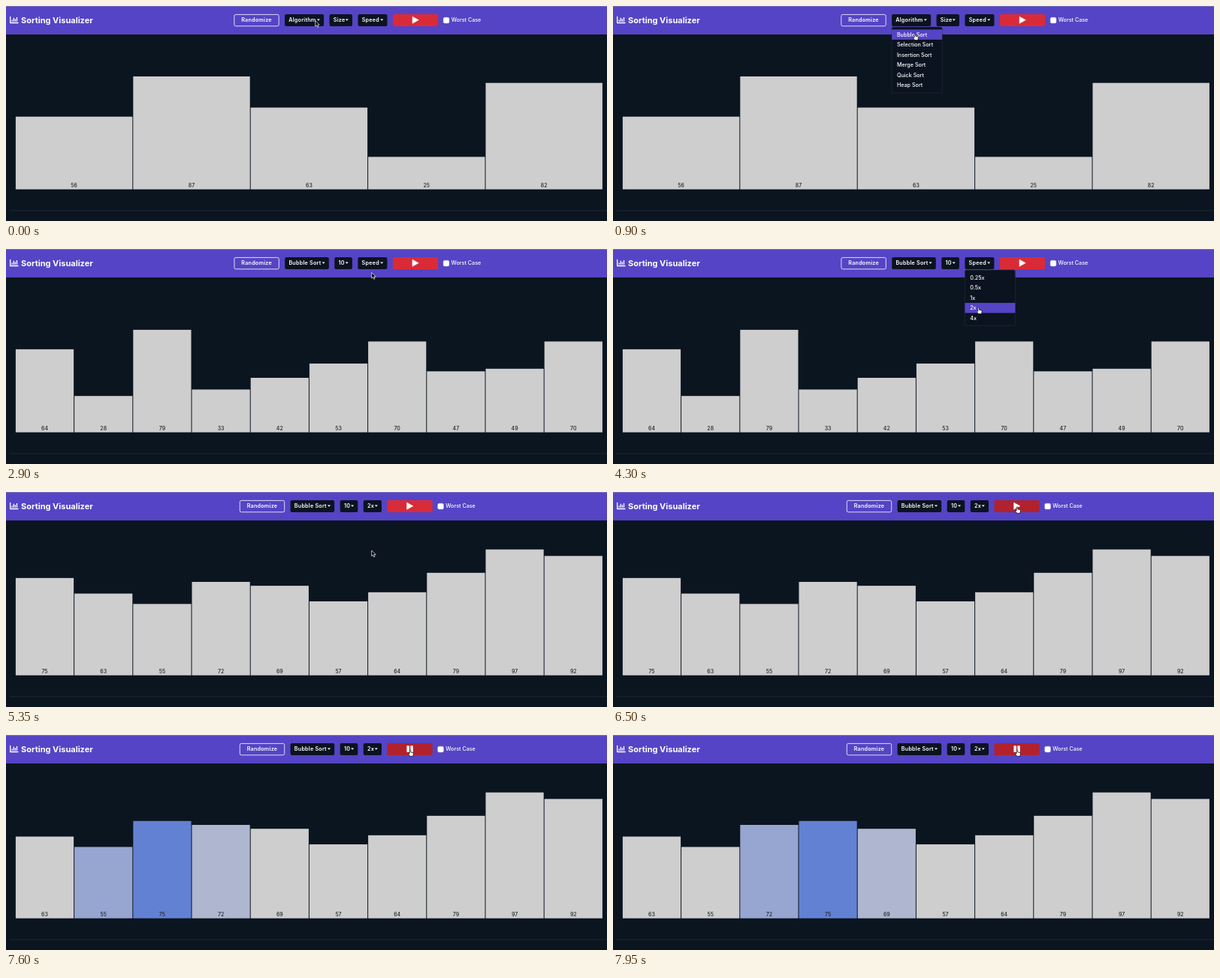
An HTML page for the animation above (8000 ms loop, 800 by 287 pixels).

```html
<!DOCTYPE html>
<html lang="en">
<head>
<meta charset="utf-8">
<title>Sorting Visualizer</title>
<style>
  html, body { margin: 0; width: 100%; height: 100%; overflow: hidden; background: #0b1520; }
  svg { display: block; width: 100vw; height: 100vh; }
  text { font-family: Inter, "Open Sans", sans-serif; font-size: 7.2px; font-weight: 500; fill: #fff; white-space: pre; }
  .title { font-size: 11px; font-weight: 700; }
  .btn { font-weight: 600; letter-spacing: .22px; }
  .num { font-size: 7px; fill: #20242a; text-anchor: middle; }
</style>
</head>
<body>
<svg id="stage" viewBox="0 0 800 287"></svg>
<script>
const LOOP = 8000, FLOOR = 244.7, UNIT = 1.732;
const PICK_ALGO = 1000, PICK_SIZE = 2400, PICK_SPEED = 4400, PLAY = 6800;
const HEIGHT_MS = 200, FADE_MS = 150;
const stage = document.getElementById('stage');

// CSS "ease": cubic-bezier(.25, .1, .25, 1)
function ease(x) {
  if (x <= 0) return 0;
  if (x >= 1) return 1;
  let lo = 0, hi = 1;
  for (let i = 0; i < 18; i++) {
    const s = (lo + hi) / 2, r = 1 - s;
    if (.75 * r * s + s * s * s < x && .75 * r * r * s + .75 * r * s * s + s * s * s < x) lo = s;
    else hi = s;
  }
  const s = (lo + hi) / 2, r = 1 - s;
  return .3 * r * r * s + 3 * r * s * s + s * s * s;
}

// Value of a chain of [time, target] events, each a transition that interrupts the last
function track(events, t, ms) {
  let [at, to] = events[0], from = to;
  const now = u => from + (to - from) * ease((u - at) / ms);
  for (const [time, target] of events.slice(1)) {
    if (time > t) break;
    from = now(time);
    at = time;
    to = target;
  }
  return now(t);
}

const latest = (events, t) => events.reduce((v, e) => e[0] <= t ? e[1] : v, events[0][1]);

// Bars: one height track and one highlight track each
const arrays = [
  [0, [56, 87, 63, 25, 82]],
  [PICK_ALGO, [47, 15, 34, 36, 60]],
  [PICK_SIZE, [64, 28, 79, 33, 42, 53, 70, 47, 49, 70]],
  [PICK_SPEED, [75, 63, 55, 72, 69, 57, 64, 79, 97, 92]]
];
const bars = Array.from({ length: 10 }, (_, i) => ({
  value: arrays.filter(a => i < a[1].length).map(([t, a]) => [t, a[i]]),
  glow: [[0, 0]]
}));

function bubbleSort(a, start, period) {
  for (let i = 0; start + i * period < LOOP; i++) {
    const t = start + i * period, pair = [i, i + 1];
    pair.forEach(k => bars[k].glow.push([t, 1]));
    if (a[i] > a[i + 1]) {
      [a[i], a[i + 1]] = [a[i + 1], a[i]];
      pair.forEach(k => bars[k].value.push([t + 123, a[k]]));
    }
    pair.forEach(k => bars[k].glow.push([t + 332, 0]));
  }
}
bubbleSort([...arrays[3][1]], 6873, 350);

const menus = [
  { slot: 1, open: 350, close: PICK_ALGO, items: ['Bubble Sort', 'Selection Sort', 'Insertion Sort', 'Merge Sort', 'Quick Sort', 'Heap Sort'] },
  { slot: 2, open: 1720, close: PICK_SIZE, items: ['5', '10', '20', '50', '100'] },
  { slot: 3, open: 3100, close: PICK_SPEED, items: ['0.25x', '0.5x', '1x', '2x', '4x'] }
];
const MENU = { top: 28, pad: 3.4, row: 13.5, width: 67 };

// Pointer stops: time, x, y
const path = [
  [0, 411.7, 19.5], [500, 411.7, 19.5], [850, 402, 37], [1150, 402, 37],
  [1550, 447, 18.5], [1850, 447, 18.5], [2200, 450, 51], [2550, 450, 51],
  [2900, 486.7, 31.5], [3050, 487, 20], [3450, 487, 20], [4150, 486.7, 78],
  [5450, 486.7, 78], [5950, 538, 19.7], [LOOP, 538, 19.7]
];

function pointer(t) {
  const i = path.findIndex(p => p[0] > t);
  const [t0, x0, y0] = path[i - 1], [t1, x1, y1] = path[i];
  const u = (t - t0) / (t1 - t0), k = u * u * (3 - 2 * u);
  return { x: x0 + (x1 - x0) * k, y: y0 + (y1 - y0) * k };
}

const rect = (x, y, w, h, fill, rx = 0, extra = '') =>
  `<rect x="${x}" y="${y}" width="${w}" height="${h}" rx="${rx}" fill="${fill}" ${extra}/>`;
const text = (x, y, s, cls = '', extra = '') =>
  `<text x="${x}" y="${y}" class="${cls}" ${extra}>${s}</text>`;
const shape = (d, extra) => `<path d="${d}" ${extra}/>`;

// Toolbar slots centred as a row: Randomize, three dropdowns, play
function layout(t) {
  const widths = [60.2, t < PICK_ALGO ? 52 : 58.6, t < PICK_SIZE ? 30.4 : 23.6, t < PICK_SPEED ? 39 : 24.2, 60.2];
  let x = 303.4 + (241.8 - widths.reduce((a, b) => a + b)) / 2;
  return widths.map(w => {
    const slot = { x, w };
    x += w + 7.5;
    return slot;
  });
}

const over = (p, s) => p.x >= s.x && p.x <= s.x + s.w && p.y >= 11 && p.y <= 27;

function dropdown({ x, w }, label) {
  const c = x + w - 7.2;
  return rect(x, 11, w, 16, '#0b1320', 2) + text(x + 5.2, 21.3, label, 'btn') +
    shape(`M${c - 2} 17.6h4l-2 2.1z`, 'fill="#fff"');
}

function header(t, slots, p) {
  const [rand, algo, size, speed, play] = slots;
  const mid = play.x + play.w / 2, end = play.x + play.w + 7;
  const icon = t < PLAY
    ? shape(`M${mid - 4} 14.2v9l8.2-4.5z`, 'fill="#fff" stroke="#fff" stroke-width=".6" stroke-linejoin="round"')
    : rect(mid - 4.2, 14.2, 3.5, 8.8, '#fff', .7) + rect(mid + .7, 14.2, 3.5, 8.8, '#fff', .7);
  return rect(0, 0, 800, 38, '#5544c5') + rect(0, 0, 800, .8, '#8079b8') +
    shape('M5.7 14.5v8h10.3', 'fill="none" stroke="#fff" stroke-width="1.3" stroke-linecap="round" stroke-linejoin="round"') +
    shape('M8.2 20.8v-2.2M10.3 20.8v-5M12.4 20.8v-3.6M14.5 20.8v-5.8', 'stroke="#fff" stroke-width="1.3"') +
    text(20, 23.3, 'Sorting Visualizer', 'title') +
    rect(rand.x + .4, 11.4, rand.w - .8, 15.4, 'none', 2, 'stroke="#fff" stroke-width=".8"') +
    text(rand.x + rand.w / 2, 21.3, 'Randomize', 'btn', 'text-anchor="middle"') +
    dropdown(algo, t < PICK_ALGO ? 'Algorithm' : 'Bubble Sort') +
    dropdown(size, t < PICK_SIZE ? 'Size' : '10') +
    dropdown(speed, t < PICK_SPEED ? 'Speed' : '2x') +
    rect(play.x, 11, play.w, 16, over(p, play) ? '#b1222d' : '#d92b37', 2) + icon +
    rect(end, 15.2, 7.8, 7.8, '#fff', 1.8, 'stroke="#c9c9d6" stroke-width=".4"') +
    text(end + 10.5, 21.1, 'Worst Case');
}

function chart(t) {
  const n = t < PICK_SIZE ? 5 : 10, step = 782 / n;
  return bars.slice(0, n).map(({ value, glow }, i) => {
    const h = track(value, t, HEIGHT_MS) * UNIT, g = track(glow, t, FADE_MS);
    const mix = (a, b) => Math.round(a + (b - a) * g);
    const x = 12.9 + i * step, w = step - 1;
    return rect(x, FLOOR - h, w, h, `rgb(${mix(206, 88)},${mix(206, 121)},${mix(206, 212)})`) +
      text(x + w / 2, 241.8, latest(value, t), 'num');
  }).join('');
}

function menuItem(menu, p, x) {
  const i = Math.floor((p.y - MENU.top - MENU.pad) / MENU.row);
  return p.x >= x && p.x <= x + MENU.width && menu.items[i] ? i : -1;
}

function drawMenu(menu, x, active) {
  const { top, pad, row, width } = MENU;
  return rect(x, top, width, pad * 2 + row * menu.items.length, '#0b1320', 2, 'stroke="#2a3340" stroke-width=".5"') +
    menu.items.map((s, i) => {
      const y = top + pad + i * row;
      return (i === active ? rect(x, y, width, row, '#5544c5') : '') + text(x + 6.8, y + 9.3, s);
    }).join('');
}

function cursor({ x, y }, hand) {
  const d = hand
    ? 'M-.9 .6q.9-1.1 1.7 0v2.6l2.8.7q.9.3.8 1.3l-.5 3.4h-4.3l-2.3-3.3q.2-1.1 1.8 0z'
    : 'M0 0v7.6l1.8-1.6 1.2 2.8 1.3-.6-1.2-2.7h2.4z';
  return shape(d, `transform="translate(${x} ${y})" fill="${hand ? '#fff' : '#000'}" stroke="${hand ? '#000' : '#fff'}" stroke-width=".7" stroke-linejoin="round"`);
}

function render(t) {
  const p = pointer(t), slots = layout(t);
  const menu = menus.find(m => t >= m.open && t < m.close);
  const x = menu ? slots[menu.slot].x : 0;
  const active = menu ? menuItem(menu, p, x) : -1;
  const hand = t >= 150 && (active >= 0 || slots.some(s => over(p, s)));
  stage.innerHTML = rect(0, 0, 800, 287, '#0b1520') + header(t, slots, p) + chart(t) +
    rect(5, 272.7, 795, .8, '#222d38') +
    (menu ? drawMenu(menu, x, active) : '') + cursor(p, hand);
}

const began = performance.now();
function frame() {
  render((performance.now() - began) % LOOP);
  requestAnimationFrame(frame);
}
frame();
</script>
</body>
</html>
```
